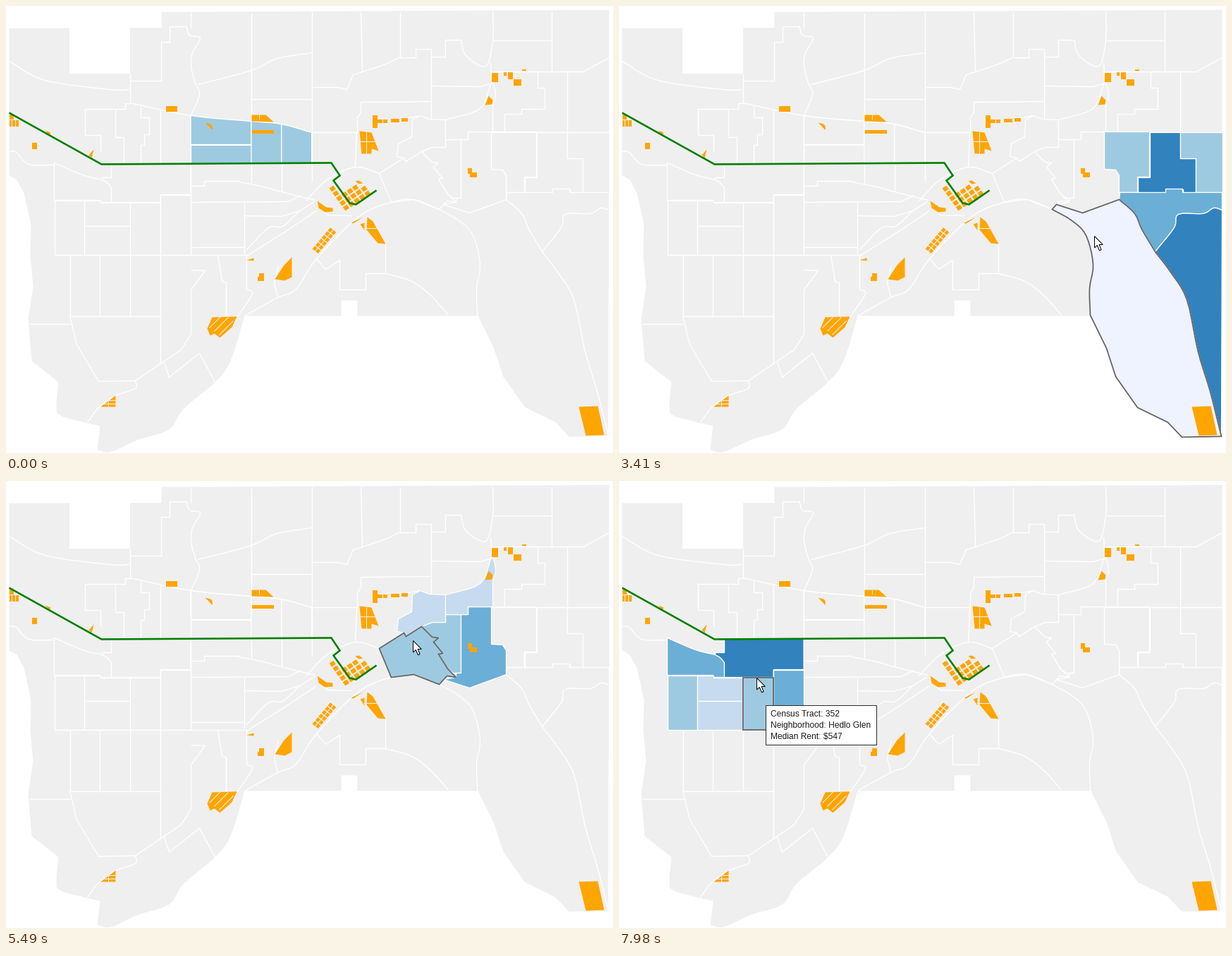
Recreate the animation shown at these times as a matplotlib script. Size 861 by 634 pixels, loop 8000 ms.

```python
import numpy as np
import matplotlib.pyplot as plt
from matplotlib.animation import FuncAnimation
from matplotlib.collections import LineCollection, PolyCollection
from matplotlib.patches import Polygon, Rectangle

W, H, DPI = 861, 634, 64
STEP, LOOP = 20, 8000
PX = 72 / DPI  # points per pixel
GREY, ORANGE, GREEN = "#efefef", "#ffa500", "#008000"
PALE, LIGHT, SOFT, MID, DEEP = "#eff3ff", "#c6dbef", "#9ecae1", "#6baed6", "#3182bd"

plt.rcParams["font.family"] = "Liberation Sans"


def pts(*n):
    return np.reshape(n, (-1, 2)).astype(float)


def chain(*parts):
    return np.vstack(parts)


def walk(x, y, *turns):
    """Right-angled path: turns give the next x, then y, and so on."""
    path = [(x, y)]
    for k, value in enumerate(turns):
        x, y = (x, value) if k % 2 else (value, y)
        path.append((x, y))
    return np.array(path, float)


def curve(*n, per=5):
    """Catmull-Rom spline through the given points."""
    p = pts(*n)
    p = chain(2 * p[:1] - p[1:2], p, 2 * p[-1:] - p[-2:-1])
    u = np.linspace(0, 1, per, endpoint=False)[:, None]
    out = [b + 0.5 * u * (c - a + u * (2 * a - 5 * b + 4 * c - d
                                       + u * (3 * (b - c) + d - a)))
           for a, b, c, d in zip(p, p[1:], p[2:], p[3:])]
    return chain(*out, p[-2:-1])


def box(x0, y0, x1, y1):
    return walk(x0, y0, x1, y1, x0)


def grid(x, y, u, v, cells, fill=0.8):
    """Skewed blocks with corners spanned by u and v."""
    u, v = np.array(u), np.array(v)
    unit = box(0, 0, fill, fill) @ np.array([u, v])
    return [unit + (x, y) + i * u + j * v for i, j in cells]


def col(k):
    """Street grid of the west side."""
    return 90 + 42.9 * k


def post(k, y0, y1):
    return pts(col(k), y0, col(k), y1)


# Borders shared by several areas
ridge = curve(175, 137, 262, 155, 347, 163, 390, 167, 433, 179)
brook = curve(855, 289, 843, 286, 828, 294, 793, 295, 787, 314, 760, 348)
bluff = curve(709, 274, 731, 294, 741, 316, 760, 348)
shore = curve(760, 348, 782, 377, 805, 416, 821, 490, 838, 546, 854, 610)
bank = pts(798, 611, 778, 590, 735, 569, 704, 525, 691, 485, 668, 438)
bend = curve(668, 438, 667, 400, 672, 366, 662, 325, 642, 304, 614, 288)
notch = walk(710, 264, 775, 259, 799, 264, 817)
elbow = curve(149, 257, 143, 250, 136, 246)
cut = pts(589, 206, 604, 221, 613, 222, 606, 228, 619, 244, 613, 245, 626, 266, 638, 278)
dip = pts(620, 281, 657, 293, 709, 274)
ledge = pts(709, 264, 709, 240, 704, 232, 688, 231)

land = chain(
    walk(4, 31, 89.5, 95.5, 175.5, 30.5, 220, 8, 262), pts(855, 5, 855, 610), bank,
    walk(668, 439, 498, 417, 475, 439, 338),
    curve(338, 439, 318, 503, 295, 534, 251, 571, 231, 600, 186, 615, 148, 632, 129, 629),
    pts(133, 595), curve(110, 590, 76, 580, 71, 566, 74, 533),
    pts(36, 503, 31, 444, 38, 397, 34, 353, 35, 310, 25, 265, 15, 246, 4, 240))


def under(k0, k1, y):
    """Area between two columns, from the ridge down to y."""
    x = np.linspace(col(k0), col(k1), 12)
    top = np.interp(x, *ridge.T)
    return chain(np.column_stack([x, top]), [[x[-1], y], [x[0], y]])


big = chain(pts(614, 288), dip, bluff, shore, bank, bend)
rise = chain(cut, pts(625, 276, 614, 288, 578, 274, 546, 278, 529, 237, 564, 215, 567, 220))
block = box(col(2), 278, col(3), 352)

north = [(under(4, 6, 196), SOFT), (box(col(4), 196, col(6), 222), SOFT),
         (under(6, 7, 222), SOFT), (under(7, 8, 222), SOFT)]
east = [
    (chain(walk(688, 178, 752, 242, 735, 264), ledge), SOFT),
    (chain(walk(752, 178, 795, 215, 817, 264), notch[-2:0:-1],
           walk(735, 264, 735, 242, 752)), DEEP),
    (walk(795, 178, 855, 264, 817, 215, 795), SOFT),
    (chain(notch, pts(855, 264), brook, bluff[::-1]), MID),
    (chain(brook, shore), DEEP),
    (big, PALE),
]
hill = [
    (rise, SOFT),
    (chain(cut[:-1], walk(634, 272, 645, 189, 623, 200, 604)), SOFT),
    (chain(walk(638, 272, 645, 189, 655, 178, 688, 231), ledge[::-1], dip[::-1],
           cut[-1:]), MID),
    (chain(pts(554, 213, 556, 195, 575, 185, 576, 161, 587, 155, 600, 160),
           walk(623, 161, 623, 200, 604), pts(589, 206, 567, 220, 564, 215)), LIGHT),
    (chain(curve(623, 161, 672, 145, 688, 109, 694, 126, 690, 140),
           walk(690, 178, 655, 189, 623)), LIGHT),
]
west = [
    (chain(walk(149, 257, 149, 278, 133, 275, 68, 222), curve(68, 222, 108, 239, 136, 246),
           elbow[::-1]), MID),
    (chain(elbow, walk(136, 243, 149, 223.5, 261.6, 267, col(3), 278, 149)), DEEP),
    (box(col(3), 267, col(4), 352), MID),
    (box(68, 275, 110.5, 352), SOFT),
    (walk(110.5, 275, 133, 278, col(2), 311, 110.5), LIGHT),
    (box(110.5, 311, col(2), 352), LIGHT),
    (block, SOFT),
]

# Remaining white borders
avenues = [post(k, 352, 439) for k in range(3)]
avenues += [post(3, 147, 223), post(3, 352, 507), post(4, 8, 30), post(4, 155, 352),
            post(6, 9, 163), post(6, 223, 250), post(7, 223, 262), post(8, 7, 247)]
streets = [pts(x0, y, x1, y) for y, x0, x1 in
           [(352, 68, 341), (439, 90, 219), (450.5, 32, 90), (341, 262, 337),
            (131.5, 347, 433), (178, 688, 855), (48, 690, 773), (92, 690, 820)]]
north_side = [
    ridge, curve(4, 78, 55, 105, 148, 118, 175, 118), pts(175.5, 95, 175.5, 137),
    walk(175.5, 105, 219, 50, 231, 28.5, 255),
    curve(255, 28, 260, 41, 275, 45, 264, 66, 262, 85, 268, 109, 274, 125, 262, 155),
    curve(272, 111, 347, 91, 384, 74, 433, 66),
    walk(111, 182, 111, 145, 168, 137, 175), walk(111, 182, 133, 205),
    walk(154, 145, 154, 185, 166, 223), walk(190, 141, 190, 157, 202, 181, 195, 196, 190, 222),
    pts(433, 115, 470, 115, 483, 118, 492, 97, 505, 93, 503, 8),
    curve(505, 93, 540, 81, 558, 72), walk(558, 8, 558, 72, 580, 60, 602, 135, 602, 160),
    chain(walk(602, 72, 623, 48, 645), curve(645, 48, 652, 70, 680, 85, 690, 48, 690, 8)),
    pts(602, 113, 672, 114, 689, 109, 687, 80),
    walk(433, 178, 497, 160), pts(497, 160, 503, 150, 503, 136, 602, 135),
    pts(773, 7, 773, 92), pts(795, 92, 795, 178), pts(820, 92, 855, 73),
    walk(753, 92, 753, 115, 763, 145, 730, 152, 706, 178),
    pts(540, 164, 587, 155), pts(497, 178, 495, 228),
]
south_side = [
    curve(4, 206, 14, 207, 32, 224, 68, 225),
    chain(walk(262, 255, 281, 248, 330), curve(330, 249, 365, 256, 390, 263, 438, 275)),
    pts(262, 278, 400, 277, 418, 268), pts(337, 278, 337, 350),
    pts(337, 297, 390, 298, 416, 290, 437, 277),
    curve(341, 345, 372, 314, 392, 312, 416, 290), pts(341, 354, 392, 322, 440, 290),
    curve(529, 237, 495, 228, 455, 246, 425, 276), pts(440, 278, 455, 296, 490, 297),
    chain(walk(341, 352, 341, 402), curve(341, 402, 349, 408, 327, 441)),
    pts(300, 353, 306, 390, 312, 392, 312, 440),
    curve(614, 288, 578, 274, 546, 278, 500, 298, 440, 358, 411, 401, 385, 413, 338, 439),
    chain(pts(440, 358, 453, 373), walk(473, 360, 473, 402, 510, 379, 538, 337)),
    curve(538, 379, 575, 390, 603, 411, 627, 438), pts(386, 368, 380, 392, 385, 413),
    pts(90, 439, 100, 480, 131, 532, 183, 531, 248, 487, 262, 465, 262, 402, 282, 375, 262, 374),
    curve(183, 531, 183, 542, 155, 552, 132, 568, 115, 590),
    pts(224, 505, 231, 526, 274, 492, 296, 533),
]

# Orange sites
sites = [box(*b) for b in [
    (4, 153, 10, 160), (36, 193, 43, 202), (226, 141, 242, 149), (348, 175, 379, 180),
    (545, 159, 557, 164), (560, 158, 569, 163), (688, 94, 697, 107), (705, 93, 709, 98),
    (711, 93, 718, 103), (719, 103, 730, 112), (731, 89, 737, 91), (654, 229, 660, 237)]]
sites += [
    pts(55, 176, 63, 179, 61, 183), pts(117, 211, 124, 203, 121, 215),
    curve(282, 165, 291, 168, 292, 175, 287, 170), pts(348, 154, 368, 154, 379, 164, 348, 163),
    walk(519, 154, 526, 160, 540, 165, 526, 172, 519),
    pts(501, 177, 518, 179, 528, 205, 518, 202, 518, 209, 504, 209),
    pts(679, 140, 684, 127, 690, 133, 689, 139), box(657, 235, 667, 242),
    pts(441, 276, 454, 285, 463, 286, 463, 291, 452, 292, 443, 286),
    pts(489, 307, 506, 299, 492, 308), pts(502, 309, 508, 307, 508, 318),
    pts(512, 299, 520, 305, 538, 337, 527, 336, 511, 317),
    pts(495, 248, 500, 247, 506, 251, 500, 252), pts(341, 360, 351, 357, 351, 361),
    walk(358, 378, 365, 389, 356, 383, 358),
    pts(381, 387, 394, 367, 405, 356, 405, 384, 395, 389),
    pts(285, 457, 292, 441, 327, 440, 320, 455, 303, 470, 295, 464, 289, 467),
    pts(134, 568, 155, 552, 155, 568), pts(812, 568, 839, 567, 848, 608, 822, 609),
]
sites += grid(4, 161, (4.7, 0), (0, 12), [(i, 0) for i in range(3)])
sites += grid(434, 344, (4.4, -5.2), (4.6, 3.6), [(i, j) for i in range(6) for j in range(2)])
sites += grid(458, 258, (7.6, -5), (4.8, 6.7),
              [(i, j) for i in range(5) for j in range(5) if i == 0 or j >= max(2, i - 1)], 0.76)
seams = [pts(288 + 7 * k, 456 + 5 * k, 308 + 7 * k, 436 + 5 * k) for k in range(3)]
seams += [pts(x, y0, x, y1) for x, y0, y1 in
          [(144, 556, 568), (510, 178, 210), (533, 157, 167), (358, 153, 160)]]
seams += [pts(x, y, x + 21, y) for x, y in [(134, 563), (134, 558), (501, 191), (506, 314)]]
rail = pts(4, 151, 135, 224, 461, 222, 473, 240, 464, 247, 487, 279, 496, 281, 525, 261)

hovers = [(1300, big), (3760, rise), (5560, None), (6400, block)]
picks = [(0, 0), (2350, 1), (4720, 2), (7110, 3)]

# pointer legs: start, end, from, to, ease-out power for x and y
legs = [(870, 1540, (859, 632), (743, 462), (2.4, 1.5)),
        (2940, 3940, (743, 462), (580, 227), (0.9, 1.4)),
        (5480, 6300, (577, 226), (190, 306), (1.2, 1)),
        (7110, 7260, (190, 306), (195, 298), (1, 1)),
        (7650, 7900, (195, 298), (195, 279), (1, 1))]

# start, end, left, top, width, tract, neighborhood, rent
notes = [(1770, 1910, 755, 481, 157, 374, "Quarnlea", 384),
         (4230, 4460, 592, 242, 170, 345, "Mirdan's Slope", 541),
         (7650, LOOP, 207, 317, 157, 352, "Hedlo Glen", 547)]

fig = plt.figure(figsize=(W / DPI, H / DPI), dpi=DPI, facecolor="white")
ax = fig.add_axes([0, 0, 1, 1])
ax.set(xlim=(-0.5, W - 0.5), ylim=(H - 0.5, -0.5))
ax.axis("off")

ax.add_patch(Polygon(land, fc=GREY, ec="none"))
groups = [[(ax.add_patch(Polygon(p, fc=GREY, ec="white", lw=1.3 * PX)), c) for p, c in group]
          for group in (north, east, hill, west)]
borders = avenues + streets + north_side + south_side
ax.add_collection(LineCollection(borders, colors="white", linewidths=1.4 * PX, zorder=1.5))
outline = ax.add_patch(Polygon(big, fc="none", ec="#666666", lw=1.8 * PX, zorder=3))
ax.add_collection(PolyCollection(sites, facecolors=ORANGE, edgecolors="none", zorder=4))
ax.add_collection(LineCollection(seams, colors=GREY, linewidths=1.1 * PX, zorder=5))
ax.plot(*rail.T, color=GREEN, lw=2.6 * PX, zorder=6,
        solid_joinstyle="miter", solid_capstyle="butt")

frame = ax.add_patch(Rectangle((0, 0), 157, 56, fc="white", ec="#2b2b2b", lw=PX, zorder=8))
rows = [ax.text(0, 0, "", size=12 * PX, color="#1a1a1a", va="baseline", zorder=9)
        for _ in range(3)]
arrow = pts(0, 0, 0, 16.5, 3.8, 13, 7, 20.3, 9.6, 19.2, 6.6, 12, 11.8, 12)
pointer = ax.add_patch(Polygon(arrow, fc="white", ec="black", lw=PX, zorder=10))


def latest(events, t):
    """Value of the last event that has begun by time t."""
    past = [value for start, value in events if start <= t]
    return past[-1] if past else None


def tip_at(t):
    leg = latest([(leg[0], leg) for leg in legs], t)
    if leg is None:
        return None
    start, end, a, b, power = leg
    u = min(1, (t - start) / (end - start))
    return np.array(a) + (np.array(b) - a) * (1 - (1 - u) ** np.array(power))


def show_note(t):
    note = next((n for n in notes if n[0] <= t < n[1]), None)
    for item in [frame, *rows]:
        item.set_visible(note is not None)
    if note is None:
        return
    start, _, x, y, width, tract, place, rent = note
    alpha = min(1, (t - start + 2 * STEP) / 200)
    frame.set_bounds(x, y, width, 56)
    frame.set_alpha(alpha)
    texts = (f"Census Tract: {tract}", f"Neighborhood: {place}", f"Median Rent: \\${rent}")
    for k, (row, text) in enumerate(zip(rows, texts)):
        row.set_text(text)
        row.set_position((x + 7.5, y + 16.5 + 16 * k))
        row.set_alpha(alpha)


def update(i):
    t = i * STEP
    chosen = latest(picks, t)
    for k, group in enumerate(groups):
        for patch, color in group:
            patch.set_facecolor(color if k == chosen else GREY)
            patch.set_zorder(2 if k == chosen else 1)

    shape = latest(hovers, t)
    outline.set_visible(shape is not None)
    if shape is not None:
        outline.set_xy(shape)

    tip = tip_at(t)
    pointer.set_visible(tip is not None)
    if tip is not None:
        pointer.set_xy(arrow + np.round(tip))
    show_note(t)
    return []


anim = FuncAnimation(fig, update, frames=LOOP // STEP, interval=STEP,
                     init_func=lambda: update(0), repeat=True, repeat_delay=0)
plt.show()
```
